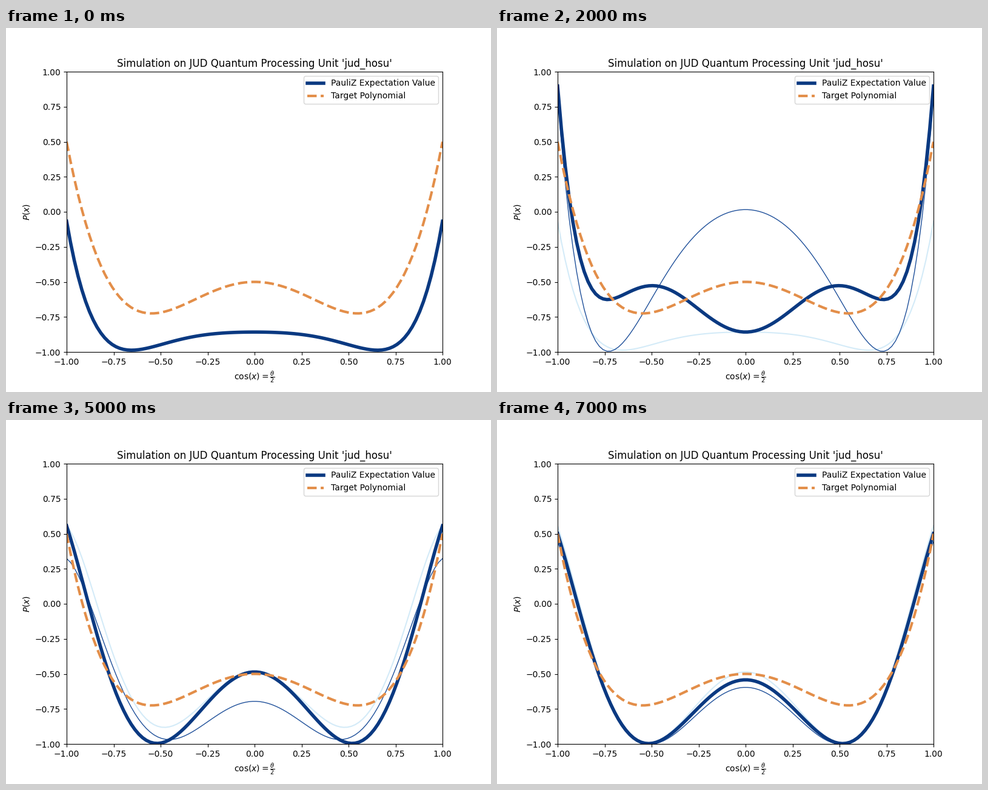
A matplotlib script that plays this animation: 800 by 600 pixels, repeating every 8 s.

```python
import numpy as np
import matplotlib.pyplot as plt
from matplotlib.animation import FuncAnimation

LIGHT, MID, DARK, ORANGE = "#D4EBF8", "#1F509A", "#0A3981", "#E38E49"

# Coordinate search: each step turns one phase gate by pi / divisor
START = [-0.322, -1.430, -1.798, 1.912]
MOVES = [(2, 3), (1, 3), (0, 6), (3, 12), (1, -12), (3, 24), (1, -48)]

x = np.linspace(-1, 1, 100)
theta = 2 * np.arccos(x)


def rotate(a, b, angle):
    c, s = np.cos(angle), np.sin(angle)
    return a * c - b * s, a * s + b * c


def expectation(phases):
    """Z of a Bloch vector turned by phase gates (about X) and the signal (about Z)."""
    bx, by, bz = np.zeros_like(x), np.zeros_like(x), np.ones_like(x)
    for i, phase in enumerate(phases):
        if i:
            bx, by = rotate(bx, by, theta)
        by, bz = rotate(by, bz, phase)
    return bz


phases = np.array(START)
curves = [expectation(phases)]
for gate, divisor in MOVES:
    phases[gate] += np.pi / divisor
    curves.append(expectation(phases))

fig, ax = plt.subplots(figsize=(8, 6), dpi=100)
older, = ax.plot([], [], color=LIGHT, lw=1.5)
previous, = ax.plot([], [], color=MID, lw=1)
current, = ax.plot([], [], color=DARK, lw=4, label="PauliZ Expectation Value")
ax.plot(x, 2.5 * x ** 4 - 1.5 * x ** 2 - 0.5, "--", color=ORANGE, lw=3,
        label="Target Polynomial")

ax.set_xlim(-1, 1)
ax.set_ylim(-1, 1)
ax.set_title("Simulation on JUD Quantum Processing Unit 'jud_hosu'")
ax.set_xlabel(r"$\cos(x)=\frac{\theta}{2}$")
ax.set_ylabel(r"$P(x)$")
ax.legend(loc="upper right")


def update(step):
    for age, line in enumerate((current, previous, older)):
        if step >= age:
            line.set_data(x, curves[step - age])
        else:
            line.set_data([], [])
    return current, previous, older


anim = FuncAnimation(fig, update, frames=len(curves), interval=1000,
                     repeat=True, repeat_delay=0)
plt.show()
```
